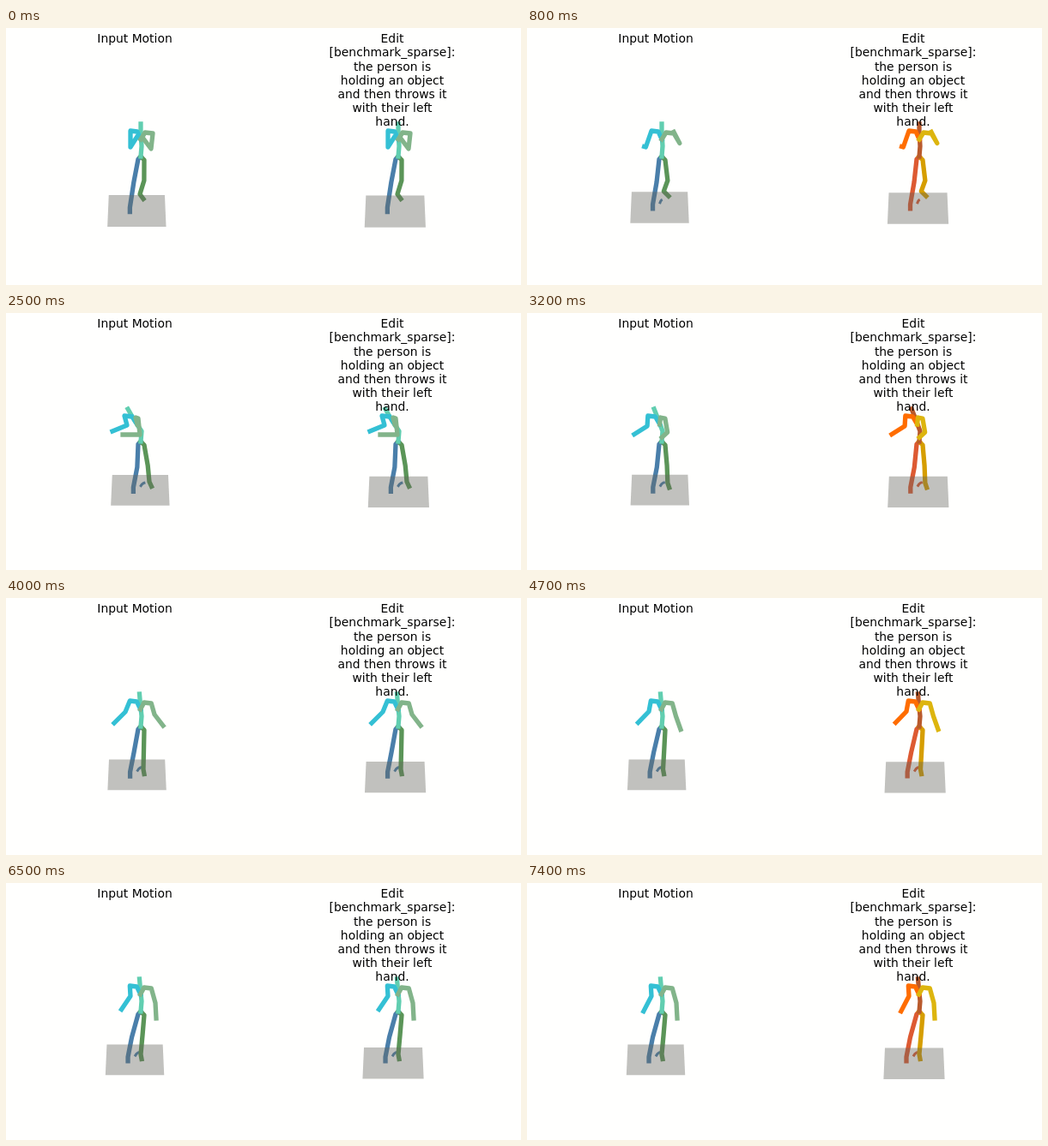
Write an HTML page that moves like this. It is 600x300 px and loops after 7.5 s.

```html
<!DOCTYPE html>
<html lang="en">
<head>
<meta charset="utf-8">
<title>Motion editing</title>
<style>
  html, body { margin: 0; width: 100%; height: 100%; overflow: hidden; background: #fffffe; }
  svg { display: block; width: 600px; height: 300px; }
  polyline { fill: none; stroke-width: 5.3; stroke-linecap: square; stroke-linejoin: round; }
  .trail { stroke-width: 3; stroke-linecap: butt; }
  .ground { fill: rgba(100, 100, 93, .4); }
  text { font: 13.89px "DejaVu Sans", sans-serif; text-anchor: middle; fill: #000; }
</style>
</head>
<body>
<svg viewBox="0 0 600 300">
  <g id="input"></g>
  <g id="edit" transform="translate(300 0)"></g>
  <text x="150" y="17">Input Motion</text>
  <g id="caption"></g>
</svg>
<script>
const LOOP = 7500, STEP = 100, KEY_EVERY = 5;
const NS = "http://www.w3.org/2000/svg";
const COOL = { trail: "#4a7faa", legL: "#4a7faa", legR: "#5b9558", spine: "#61ceb0", armL: "#34c0d4", armR: "#82b48a" };
const WARM = { trail: "#dd5a32", legL: "#dd5a32", legR: "#d69e00", spine: "#b95a2c", armL: "#ff6d00", armR: "#ddb50e" };
const CHAINS = Object.keys(COOL);

// Key gestures, in seconds; the rest of the body follows from them
const keys = [
  { t: 0, turn: 0, elbowL: [145, 139], handL: [152, 128], elbowR: [169, 141], handR: [160, 129], ankle: [156, 194] },
  { t: 1.5, turn: 0, elbowL: [133, 139], handL: [124, 147], elbowR: [185, 129], handR: [180, 115], ankle: [162, 188] },
  { t: 2.5, turn: 1, elbowL: [141, 131], handL: [124, 138], elbowR: [156, 142], handR: [136, 142], ankle: [167, 197] },
  { t: 4, turn: .1, elbowL: [139, 133], handL: [126, 146], elbowR: [173, 136], handR: [183, 149], ankle: [160, 200] },
  { t: 5.4, turn: .1, elbowL: [145, 132], handL: [133, 145], elbowR: [174, 140], handR: [175, 158], ankle: [157, 200] }
];

const mix = (a, b, u) =>
  Array.isArray(a) ? a.map((v, i) => mix(v, b[i], u)) : a + (b - a) * u;

function gestureAt(t) {
  const next = keys.findIndex(key => key.t > t);
  if (next < 0) {
    const last = keys[keys.length - 1], rest = t - last.t;
    const [x, y] = last.handL;
    return { ...last, handL: [x + 1.4 * rest, y + 2.4 * rest] };
  }
  const a = keys[next - 1], b = keys[next];
  const u = (t - a.t) / (b.t - a.t);
  const ease = u * u * (3 - 2 * u);
  const gesture = {};
  for (const name in a) gesture[name] = mix(a[name], b[name], ease);
  return gesture;
}

// The floor sways to the right and back while it settles upwards
const groundAt = t => ({
  x: 150 + 6.7 * Math.exp(-(((t - 2.05) / 2) ** 2)),
  y: 188.4 + 6.6 * Math.exp(-t)
});

function bodyAt(t) {
  const { turn, elbowL, handL, elbowR, handR, ankle } = gestureAt(t);
  const { x, y } = groundAt(t);
  const [ax, ay] = ankle;
  const lift = 200 - ay;
  const root = [157, 150], chest = [157 - 4 * turn, 130];
  const footX = x - 8, footY = y + 19.5;
  const hook = Math.min(1, t / 1.5);
  return {
    trail: t ? [[x, y + 14], [x + 2 * hook, y + 11], [x + 4 * hook, y + 9.5], [x + 6 * hook, y + 9]] : [],
    legL: [root, [154, 153], [footX + 4.5, 180], [footX, footY - 5], [footX, footY]],
    legR: [root, [161, 154], [(161 + ax) / 2 + .4 * lift, 178], ankle, [ax + 1 + .5 * lift, ay + 5.5]],
    spine: [root, [158, 138], [157 - 7 * turn, 121 + 5 * turn], [157 - 15 * turn, 112]],
    armL: [chest, [153 - 6 * turn, 121], [145 - 7 * turn, 120], elbowL, handL],
    armR: [chest, [162 - 11 * turn, 122], [171 - 17 * turn, 123], elbowR, handR]
  };
}

function add(parent, tag, attrs) {
  const el = document.createElementNS(NS, tag);
  for (const name in attrs) el.setAttribute(name, attrs[name]);
  return parent.appendChild(el);
}

function makePanel(id, half) {
  const g = document.getElementById(id);
  const lines = CHAINS.map(name => add(g, "polyline", { class: name }));
  return { lines, ground: add(g, "polygon", { class: "ground" }), half };
}

const input = makePanel("input", 32.6);
const edit = makePanel("edit", 34);

const caption = ["Edit", "[benchmark_sparse]:", "the person is", "holding an object",
  "and then throws it", "with their left", "hand."];
caption.forEach((line, i) => {
  const y = Math.round(17.2 + i * 16.17);
  add(document.getElementById("caption"), "text", { x: 450, y }).textContent = line;
});

function drawPanel({ lines, ground, half }, body, colors, { x, y }) {
  CHAINS.forEach((name, i) => {
    lines[i].setAttribute("points", body[name].join(" "));
    lines[i].setAttribute("stroke", colors[name]);
  });
  // A nearer floor looks deeper
  const base = half + 1.6, low = y + 35.8 + .2 * (y - 188.4);
  ground.setAttribute("points",
    [[x - half, y], [x + half, y], [x + base, low], [x - base, low]].join(" "));
}

function draw(now) {
  const frame = Math.floor((now % LOOP) / STEP);
  const t = frame * STEP / 1000;
  const body = bodyAt(t), floor = groundAt(t);
  drawPanel(input, body, COOL, floor);
  drawPanel(edit, body, frame % KEY_EVERY ? WARM : COOL,
    { x: floor.x + 1, y: floor.y + .5 + .48 * t });
}

const start = performance.now();
function tick() {
  draw(performance.now() - start);
  requestAnimationFrame(tick);
}
tick();
</script>
</body>
</html>
```
